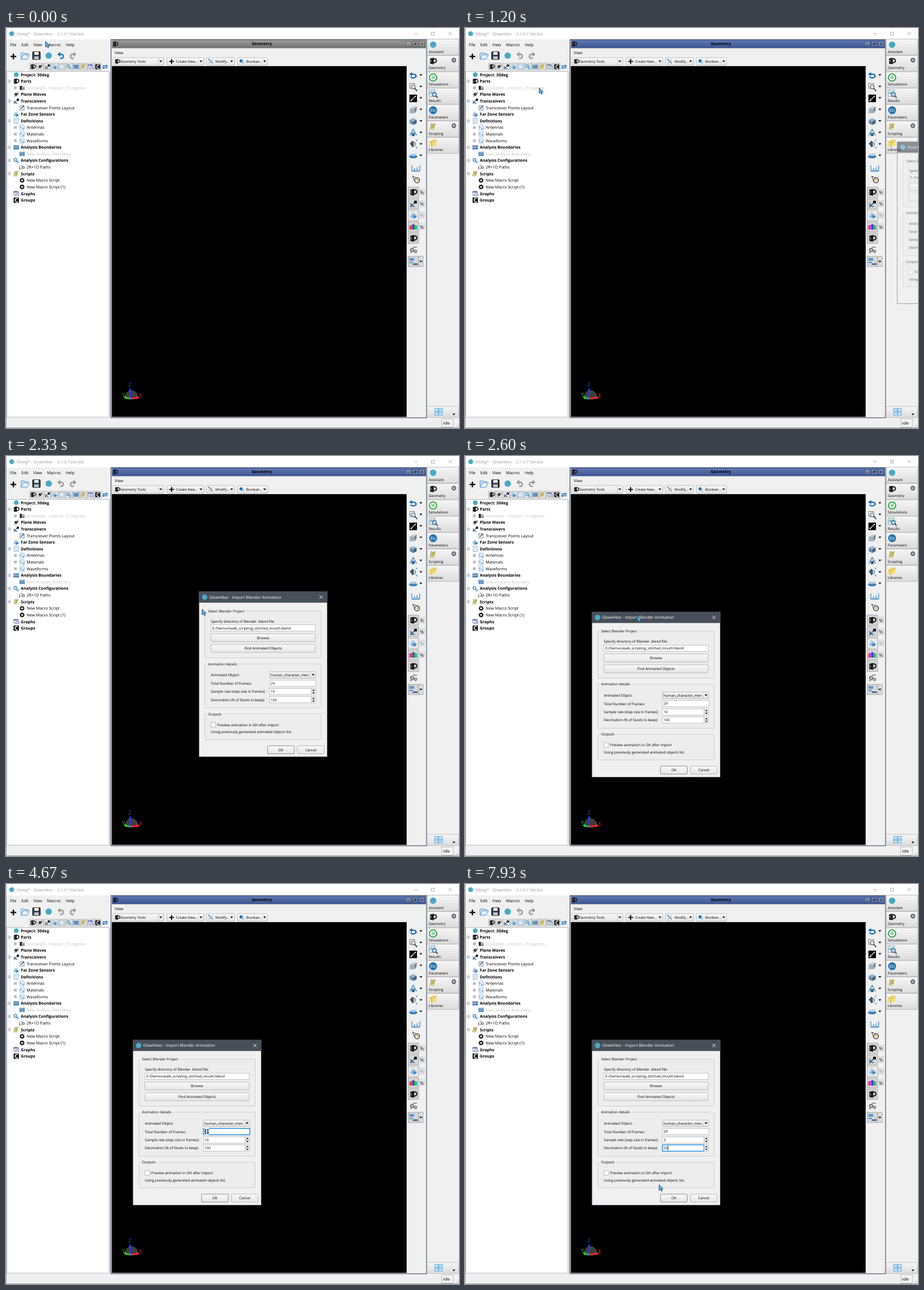
These frames come from a looping animation (796x703 px, 8000 ms). An HTML page:

```html
<!DOCTYPE html>
<html lang="en">
<head>
<meta charset="utf-8">
<title>Import animation</title>
<style>
html, body { margin: 0; width: 100%; height: 100%; overflow: hidden; background: #f0f0f0; }
svg { display: block; position: absolute; left: 0; top: 0; }
text { font-family: "Open Sans", "Noto Sans", sans-serif; text-rendering: geometricPrecision; white-space: pre; }
</style>
</head>
<body>
<svg id="stage" width="796" height="703" viewBox="0 0 796 703"></svg>
<script>
const LOOP = 8000, TICK = 200 / 3;
const APP = 'GlowHiker', ABBR = 'GH';
const $ = id => document.getElementById(id);

// ---------- drawing helpers ----------
const rect = (x, y, w, h, fill, stroke, more = '') =>
  `<rect x="${x}" y="${y}" width="${w}" height="${h}" fill="${fill}"${stroke ? ` stroke="${stroke}"` : ''} ${more}/>`;
const path = (d, stroke, w = 1, fill = 'none') =>
  `<path d="${d}" stroke="${stroke}" stroke-width="${w}" fill="${fill}"/>`;
const shape = (d, fill) => `<path d="${d}" fill="${fill}"/>`;
const dot = (x, y, r, fill, stroke = 'none', w = 1) =>
  `<circle cx="${x}" cy="${y}" r="${r}" fill="${fill}" stroke="${stroke}" stroke-width="${w}"/>`;
const text = (x, y, s, size = 7.1, fill = '#000', more = '') =>
  `<text x="${x}" y="${y + size * .36}" font-size="${size}" fill="${fill}" ${more}>${s}</text>`;
const BOLD = 'font-weight="700"', MID = 'text-anchor="middle"';
const tri = (x, y, fill = '#111') => shape(`M${x - 2.6} ${y - 1.3}h5.2l-2.6 3z`, fill);
const grad = (id, a, b) =>
  `<linearGradient id="${id}" x2="0" y2="1"><stop stop-color="${a}"/><stop offset="1" stop-color="${b}"/></linearGradient>`;

// icons are drawn around 0,0 in a box of about 10 px
const ICON = {
  app: dot(0, 0, 4.3, '#4aa9c4'),
  plus: path('M-5 0H5M0-5V5', '#111', 2.4),
  geo: shape('M-4.5-4L1-5V5L-4.5 4z', '#151515') + path('M1-3.4a3 3 0 1 1 0 5.6L-2 3', '#222', 1.8) +
    path('M-3-2v4', '#aaa', .8),
  part: rect(-4.5, -4, 4, 8, '#222') + rect(0, -2.5, 5, 2, '#777') + rect(0, 1, 5, 2.5, '#555'),
  wave: path('M-4 1l3-4-1 4 3-4-1 4 4-5M-3 4l3-4 0 3 4-5', '#111', 1),
  dish: path('M-4-1Q-4 4 2 4M-2 2L2-2', '#2868a8', 1.4) + rect(1, -4.5, 4, 4, '#111') + path('M-3 2l-1 3', '#111'),
  far: shape('M-1-5L5 1Q3 5-1 4.5Q-5 3-5 0z', '#8dbbe0') + shape('M0 0l5 1Q3 5 0 4z', '#3c83c4') +
    path('M-5 1Q-2-2 1-4', '#dceaf5'),
  page: rect(-4, -4.5, 8, 9, '#f3f9ff', '#6b9cc9', 'stroke-width=".8"') + path('M-2-2h4M-2 0h4M-2 2h4', '#9fc3e2', .7),
  layout: rect(-4, -4, 8, 8.5, '#f6f9fc', '#536d88', 'stroke-width=".9"') + path('M-2 2L3-3', '#24425f', 1.6),
  wform: rect(-4, -4.5, 8, 9, '#f3f9ff', '#6b9cc9', 'stroke-width=".8"') + path('M-4 1q2-5 4 0t4-1', '#2c79b9', .9),
  fence: path('M-4-4.5v9M-1.3-4.5v9M1.4-4.5v9M4-4.5v9M-5.2-1.5H5.2M-5.2 2H5.2', '#1f66a8', 1.2),
  cogs: dot(-1.5, -1.2, 2.7, '#d9edfa', '#2f86c0', 1.3) + dot(2.6, 3, 1.7, '#d9edfa', '#2f86c0', 1),
  scroll: shape('M-3-5h7l1 2h-2l-1 7-2 1h-5l0-3h2z', '#d9cf83') + path('M-3-5l-1 8M-1-3h4M-1.5-1h4M-2 1h4', '#7c7434', .7),
  chart: rect(-4.5, -4, 8, 6.5, '#fff', '#5273b4', 'stroke-width=".8"') + rect(-4.5, -4, 8, 2, '#4269b0') +
    rect(-1, 0, 6, 4, '#fff', '#5273b4', 'stroke-width=".8"') + path('M0 3l2-2 2 1', '#c33', .7),
  group: rect(-4.8, -4.8, 9.6, 9.6, '#000') + path('M3-3Q-2-4-2 0T3 3', '#fff', 1.6),
  po: path('M-3-3a2.5 3 0 1 1-.1 5M-5 5V-2', '#333', 1) + dot(3, 1, 2, 'none', '#333'),
  gear: dot(0, 0, 2.9, '#fff', '#111', 2) + path('M0-5v2M0 3v2M-5 0h2M3 0h2M-3.5-3.5l1.4 1.4M2.1 2.1l1.4 1.4M3.5-3.5L2.1-2.1M-2.1 2.1l-1.4 1.4', '#111', 1.3),
  sync: path('M-5-1.5H3M-3 2H5', '#1f7ac6', 1.8) + shape('M2-4.5l4 3-4 2zM-2 5l-4-3 4-2z', '#1f7ac6'),
  folder: shape('M-5-4h4l1 1h4v7h-9z', '#dbeaf6') + path('M-5-4h4l1 1h4v2M-5-4l0 8.5h8l3-6h-8l-3 6', '#6ba4cf', .9, '#e9f4fc'),
  save: rect(-5, -5, 10, 10, '#2c3640', '#111', 'rx="1"') + rect(-3, -5, 6, 4, '#e8eef3') + rect(-3.2, 1, 6.4, 4, '#b7c4ce'),
  undo: path('M-2-2.5H1A3.4 3.4 0 0 1 1 4H-2', 'currentColor', 2.1) + shape('M-6-2.5L-1.5-6.5V1.5z', 'currentColor'),
  rot: path('M-4 2Q0 5 4 2Q5-2 0-2H-2', '#1b6fb4', 2) + shape('M-6-2l4.5-3V1z', '#1b6fb4'),
  zoom: rect(-5, -5, 7, 7, 'none', '#777', 'stroke-width=".8"') + dot(0, 0, 2.8, '#d7ebf8', '#567') + path('M2 2l4 4', '#345', 1.5),
  line: rect(-5.5, -5.5, 11, 11, '#000') + path('M-3 3L3-3', '#fff', 1) + dot(-3, 3, 1, '#fff') + dot(3, -3, 1, '#fff'),
  cubeG: shape('M-5-2l4-3h6l-3 3z', '#c9d4dc') + rect(-5, -2, 7, 7, '#9fb0bd') + shape('M2-2l3-3v6l-3 4z', '#71848f'),
  cubeB: shape('M-5-2.5L0-5l5 2.5L0 0z', '#9fb9cd') + shape('M-5-2.5L0 0v5.5L-5 3z', '#6d8da8') + shape('M5-2.5L0 0v5.5L5 3z', '#3f6486'),
  lamp: path('M-5 4L0-5 5 4M-3 1H3', '#447aa5', 1.1, '#cfe3f2') + rect(-2, 1, 4, 4, '#2a5f8e'),
  horn: shape('M-5-1l4-4 2 2v6l-2 2z', '#49596b') + path('M2-3Q5 0 2 3M4-5l2-1M4 4l2 2', '#2c79b9', 1),
  disc: shape('M-5-3H5L3 0H-3z', '#bcd4e8') + `<ellipse cx="0" cy="1.5" rx="6" ry="2.6" fill="#3e7fba"/>` + path('M-3 0H3', '#e4f0fa'),
  bars: path('M-6 5H6M-6-4V5M-2 0V5M2-1V5M6-4V5M0 3V5M-4 3V5M4 3V5', '#2d7cc0', 1),
  probe: dot(2, 1.5, 4, '#f5ead0', '#222', 1.1) + path('M-5-5l3 7 1-3 3-1z', '#111', .8, '#fff') + path('M2 2l2-2', '#a40'),
  rays: ['#d33', '#d3d', '#33d', '#2b3', '#2bb'].map((c, i) => rect(-6 + i * 2.3, 4 - 8 + Math.abs(2 - i), 2.3, 8 - Math.abs(2 - i), c)).join(''),
  cogsG: dot(-2, 0, 2.2, '#ddd', '#666', 1.5) + dot(3, 2, 1.7, '#ddd', '#666', 1.2) + path('M-1-4L5-4M-5 4h3', '#777', 1.2),
  panes: rect(-6, -5, 7, 4, '#6396ce') + rect(-6, .5, 5, 2, '#6396ce') + rect(-1, 3, 7, 2, '#27599a'),
  mod: path('M-4-4L4 4', '#5e93bd', 1.8) + path('M4-4L-4 4', '#9ab', 1.3) + dot(-4, -4, 1.5, '#5e93bd'),
  bool: dot(-1.5, -1, 3.4, '#2470ac') + dot(2, 2, 2.7, '#a9cbe5'),
  sim: dot(0, 0, 5.5, '#fff', '#27a03a', 1.6) + path('M0-3v6M-2-2v4M2-2v4', '#27a03a', .9),
  res: rect(-6, -6, 9, 10, '#d8eaf6', '#79a', 'stroke-width=".7"') + path('M-5 0l2-3 2 4 2-5', '#2a8', .9) + dot(2, 1, 3, '#b5d7ee', '#357') + path('M4 3l3 3', '#246', 1.6),
  fx: dot(0, 0, 7, '#2473ae') + text(0, -.3, 'f(x)', 7, '#fff', MID + ' font-style="italic"'),
  lib: shape('M-6-2l6-4 5 1v8l-7 3-4-1z', '#f2dc7a') + path('M-6-2l4 1v7M-2-1l7-3', '#c9a93c', .8),
  grid: [0, 1, 2, 3].map(i => rect(-7 + i % 2 * 7.5, -6 + (i >> 1) * 6.5, 6.5, 5.5, '#bfe0f5', '#4d9cd0', 'stroke-width=".7"')).join('')
};
const icon = (name, x, y, s = 1, more = '') => `<g transform="translate(${x} ${y}) scale(${s})" ${more}>${ICON[name]}</g>`;

// ---------- main window ----------
function titleBar() {
  return rect(0, 0, 796, 703, '#f0f0f0') + rect(0, 0, 796, 20, '#fff') +
    icon('app', 10, 10) + text(18, 10, `30deg* - ${APP} -  2.1.0.7 (64-bit)`, 7.1, '#999') +
    path('M717.5 10h6M747.5 7.5h5.500v5h-5.500zM777.500 7l6 6m0-6l-6 6', '#999', .8) +
    [['File', 7], ['Edit', 27], ['View', 48], ['Macros', 72], ['Help', 105]].map(m => text(m[1], 29, m[0])).join('');
}

function leftTools() {
  const small = ['geo', 'wave', 'dish', 'far', 'page', 'cogs', 'fence', 'scroll', 'chart', 'group'];
  return icon('plus', 13, 50) + icon('folder', 33, 49, 1.3) + icon('save', 53.5, 48.500, 1.3) + icon('app', 75, 48.500, 1.3) +
    `<g id="undo">${icon('undo', 97, 49, 1.1)}</g>` + icon('undo', 117, 49, 1.1, 'color="#999"').replace('scale(1.1)', 'scale(-1.1 1.1)') +
    small.map((n, i) => rect(41.5 + i * 12.65, 62, 11.8, 12, '#e2e2e2', '#a8a8a8', 'stroke-width=".7"') + icon(n, 47.4 + i * 12.65, 68, .88)).join('') +
    icon('sync', 174, 68, .9);
}

// rows: label, icon, level, style (b bold, g grey), expander
const ROWS = [
  ['Project: 30deg', 'app', 0, 'b'], ['Parts', 'geo', 0, 'b', '-'], ['Animated - rotation_15 degrees', 'part', 1, 'g', '+'],
  ['Plane Waves', 'wave', 0, 'b'], ['Transceivers', 'dish', 0, 'b', '-'], ['Transceiver Points Layout', 'layout', 1],
  ['Far Zone Sensors', 'far', 0, 'b'], ['Definitions', 'page', 0, 'b', '-'], ['Antennas', 'wform', 1, '', '+'],
  ['Materials', 'wform', 1, '', '+'], ['Waveforms', 'wform', 1, '', '+'], ['Analysis Boundaries', 'fence', 0, 'b', '-'],
  ['New Analysis Boundary', 'fence', 1, 'g'], ['Analysis Configurations', 'cogs', 0, 'b', '-'], ['2R+1D Paths', 'po', 1],
  ['Scripts', 'scroll', 0, 'b', '-'], ['New Macro Script', 'gear', 1], ['New Macro Script (1)', 'gear', 1],
  ['Graphs', 'chart', 0, 'b'], ['Groups', 'group', 0, 'b']
];
function tree() {
  let s = rect(1.5, 76.5, 179.5, 607.5, '#fff', '#a5adb5', 'stroke-width=".8"') +
    path('M183 76V684', '#bbb', 1) + path('M6.500 94V257', '#d0d0d0', .5);
  ROWS.forEach(([label, ic, lv, st = '', ex], i) => {
    const y = 82 + i * 11.61, x = 6 + lv * 10.5;
    if (ex) s += rect(x - 2, y - 2, 4, 4, '#fff', '#999', 'stroke-width=".7"') +
      path(`M${x - 1.2} ${y}h2.4` + (ex == '+' ? `M${x} ${y - 1.2}v2.4` : ''), '#444', .6);
    s += icon(ic, 18 + lv * 10.3, y, lv ? .9 : .95) +
      text(26 + lv * 10.3, y, label, 7.1, st == 'g' ? '#c4c4c4' : '#000', st == 'b' ? BOLD : '');
  });
  return s;
}

function geometry() {
  const btn = (x, w, label, ic, tx) => rect(x, 52, w, 13.5, 'url(#btn)', '#b0b0b0', 'rx="1.5" stroke-width=".8"') +
    icon(ic, x + 8, 58.700, .85) + text(tx, 58.8, label, 6.15) + tri(x + w - 5, 58.5);
  let s = rect(184.5, 20.5, 554.500, 664.5, '#f0f0f0', '#26384f') + rect(186, 21, 552, 14.500, 'url(#idle)', '', 'id="bar"') +
    icon('geo', 192, 28, .9) + text(449.5, 27.8, 'Geometry', 7.2, '#000', BOLD + ' ' + MID) +
    [707, 719, 731].map(x => rect(x - 4.5, 23.5, 9, 9, '#ffffff30', '#34404f', 'stroke-width=".6"')).join('') +
    path('M705 30h3.500M717.200 27.200h2.500v2.500h-2.500zM718.500 26h2.500v2.500M729 26l4 4m0-4l-4 4', '#111', .8) +
    text(191, 43, 'View', 7) + rect(186, 67, 518, 616.5, '#000') +
    btn(187.5, 89.5, 'Geometry Tools', 'geo', 200.500) + path('M268 52.5v12.5', '#bbb', .7) +
    btn(283, 64.500, 'Create New...', 'plus', 299) + btn(352, 49.500, 'Modify...', 'mod', 368) + btn(406.5, 53, 'Boolean...', 'bool', 422);
  ['rot', 'zoom', 'line', 'cubeG', 'cubeB', 'lamp', 'horn', 'disc'].forEach((n, i) => {
    s += icon(n, 715.5, 83.500 + i * 20.1, 1.2) + tri(729, 82.500 + i * 20.2);
  });
  s += icon('bars', 720, 246, 1.15) + icon('probe', 720, 266, 1.1);
  ['geo', 'dish', 'far', 'rays', 'geo', '', 'panes'].forEach((n, i) => {
    const y = 288.7 + i * 20.25;
    if (!n) { s += icon('cogsG', 716, 390, 1.2); return; }
    s += rect(706.5, y - 9, 18.5, 18, i == 2 ? '#ececec' : '#d6d6d6', '#9b9b9b', 'stroke-width=".8"') + icon(n, 716, y, 1.2);
    if (i < 4) s += rect(725.5, y - 5.5, 10, 10, '#e8e8e8', '#bbb', 'stroke-width=".6"') + text(730.7, y, '%', 8.5, i == 2 ? '#999' : '#222', MID);
    if (i == 6) s += rect(725, y - 9, 8, 18, '#dcdcdc', '#9b9b9b', 'stroke-width=".8"') + tri(729, y);
  });
  // axis gizmo
  return s + path('M209 650A11.500 13 0 0 1 232 650Q220 656 209 650z', '#555', .6, '#3d3d3d') +
    path('M218 651V636', '#2638ff', 2) + shape('M215.500 638l2.500-6 2.500 6z', '#2638ff') +
    path('M218 651l13-1', '#f22', 2.4) + shape('M229 647l7 2.500-7 3z', '#f22') +
    path('M218 651l-7-1', '#2d2', 2.4) + shape('M212 647l-5.500 1.500 4.500 4z', '#2d2') + dot(218, 651, 1.6, '#4a6cff') +
    text(217.800, 626.500, 'Z', 9.5, '#3540d8', MID) + text(236.5, 645.500, 'X', 9.5, '#c33', MID) + text(206.5, 644.500, 'Y', 9.5, '#2b2', MID);
}

function sidebar() {
  const tabs = [['Assistant', 'app'], ['Geometry', 'geo', 1], ['Simulations', 'sim'], ['Results', 'res'],
    ['Parameters', 'fx'], ['Scripting', 'scroll', 1], ['Libraries', 'lib']];
  return tabs.map(([label, ic, x], i) => {
    const y = 19.500 + i * 28.8;
    return rect(740, y, 55.5, 28, 'url(#tab)', '#b4b4b4', 'stroke-width=".8"') +
      icon(ic, 750.500, y + 9.800, i == 0 ? 1.3 : i == 4 ? 1 : 1.15) + text(743, y + 21.8, label, 6.25) +
      (x ? dot(787, y + 8.200, 4.2, '#6b7278') + path(`M785.500 ${y + 6.7}l3 3m0-3l-3 3`, '#fff', 1) : '');
  }).join('') +
    rect(740, 665, 55.500, 19.5, 'url(#tab)', '#b4b4b4', 'stroke-width=".8"') + icon('grid', 760, 674.500) + tri(787, 679) +
    rect(765.500, 687, 20.500, 14.5, '#f4f4f4', '#aaa', 'stroke-width=".8"') + text(768, 694.2, 'Idle', 7.1) +
    path('M.5 0V703M0 702.500H796', '#8795a3', .8) + path('M790 702l5-5M793 702l2-2', '#aaa', .8);
}

// ---------- dialog, laid out at its resting place 223,274 ----------
const FIELDS = [[429.700, 81.5, 'frames'], [444.300, 73, 'rate'], [458.500, 73, 'keep']];
function dialog() {
  const S = 6.25;
  const lab = (x, y, s, more) => text(x, y, s, S, '#000', more);
  const box = (y, h, label, w) => rect(233.5, y, 204.5, h, '#ededed', '#c6c6c6', 'rx="1.5" stroke-width=".8"') +
    rect(237, y - 3, w, 6, '#f0f0f0') + lab(239, y, label);
  const btn = (x, y, w, h, label, id = '', line = '#adadad') =>
    rect(x, y, w, h, 'url(#btn)', line, `rx="1.5" stroke-width=".8" ${id && `id="${id}"`}`) + lab(x + w / 2, y + h / 2, label, MID);
  let s = rect(223, 274, 225.500, 290.500, '#f0f0f0', '#3d444d', 'stroke-width=".8"') + rect(223, 274, 225.500, 19.500, '#484f59') +
    icon('app', 233, 283.800, 1.1) + text(241, 283.8, `${APP} - Import Blender Animation`, 7.1, '#fff') +
    path('M434.700 281l5.600 5.600m0-5.600l-5.600 5.600', '#fff', .9) +
    box(308, 82.500, 'Select Blender Project', 67) + box(401, 77.500, 'Animation details', 53) + box(489, 45, 'Outputs', 27) +
    lab(244, 326, 'Specify directory of Blender .blend file:') +
    rect(244, 332.500, 183.5, 11, '#fff', '#b5b5b5', 'stroke-width=".8"') + lab(246.5, 338.2, 'E:/Demos/walk_scripting_stitched_mouth.blend') +
    btn(244, 348, 183.5, 14, 'Browse', 'browse') + btn(244, 366.800, 183.5, 14, 'Find Animated Objects', 'find') +
    lab(244, 420.500, 'Animated Object:') + rect(347, 415, 81, 11, 'url(#btn)', '#adadad', 'rx="1" stroke-width=".8"') +
    lab(349, 420.6, 'human_character_men') + path('M419 415.500v10', '#bbb', .7) + tri(423.500, 420.300) +
    lab(244, 435.300, 'Total Number of Frames:') + lab(244, 449.6, 'Sample rate (step size in frames):') +
    lab(244, 464, 'Decimation (% of facets to keep):');
  FIELDS.forEach(([y, w, id], i) => {
    const c = y + 5.500;
    s += rect(347, y, w, 11, '#fff', '#b5b5b5', `stroke-width=".8" id="${id}Box"`) + rect(349, y + 1, 0, 9, '#0b4384', '', `id="${id}Sel"`) +
      lab(349, c, '', `id="${id}"`) + rect(349, y + 1.200, .8, 8.600, '#000', '', `id="${id}Caret"`);
    if (i) s += rect(420.5, y, 7.5, 11, '#f3f3f3', '#b5b5b5', 'stroke-width=".6"') + path(`M420.500 ${c}h7.500`, '#bbb', .6) +
      shape(`M422 ${c - 1.500}h4.400l-2.200-2.600zM422 ${c + 1.500}h4.400l-2.200 2.600z`, '#111');
  });
  return s + rect(244, 504, 8, 8, '#fff', '#aaa', 'stroke-width=".8" id="check"') +
    lab(255, 508, `Preview animation in ${ABBR} after import`) + lab(244, 520.7, 'Using previously generated animated objects list.') +
    btn(343.500, 545, 47, 14, 'OK', '', '#777') + btn(396, 545, 47, 14, 'Cancel');
}

$('stage').innerHTML = '<defs>' + grad('btn', '#f8f8f8', '#e6e6e6') + grad('tab', '#f6f6f6', '#dcdcdc') +
  grad('idle', '#9c9c9c', '#707070') + grad('live', '#6078b2', '#3d5492') + '</defs>' +
  titleBar() + leftTools() + tree() + geometry() + sidebar() + `<g id="dlg">${dialog()}</g>` +
  '<path id="arrow" d="M0 0V10L2.300 8 4 11.500 5.700 10.700 4.200 7.400H7.200z" fill="#5bb3e8" stroke="#173a5a" stroke-width=".8"/>' +
  '<path id="beam" d="M-4-5.200H4M-4 5.200H4M0-5V5" fill="none" stroke="#111" stroke-width="1.400"/>';

// ---------- motion: rows of time, x, y ----------
const MOUSE = [
  [70, 69.5, 23.5], [400, 92, 62], [667, 129.5, 105], [1200, 129.5, 105], [1667, 837, 206], [2133, 837, 206],
  [2200, 537.5, 217], [2267, 420, 246], [2333, 345, 269], [2400, 312, 279], [2467, 303, 281], [2600, 303, 281],
  [3000, 328, 352], [3333, 366.5, 433], [3400, 366.5, 433], [3600, 368.5, 436], [3800, 369.5, 436],
  [4067, 370, 436.5], [4133, 370, 438], [4267, 370, 438], [4533, 353, 435], [4667, 352.5, 435],
  [5467, 415, 466], [5533, 415, 466], [5867, 384.5, 453.5], [6000, 384.5, 453.5], [6067, 380, 451], [6267, 347, 450],
  [6400, 347, 450], [6533, 372, 464], [6600, 372, 464], [6933, 327.5, 466], [7667, 327.5, 466], [7933, 341, 528.5]
];
const DRAG = [[2133, 757, 197], [2200, 598, 198], [2267, 458, 209], [2333, 340, 238], [2400, 265, 261], [2467, 232, 272], [2533, 223, 274]];

function at(keys, t) {
  let i = 0;
  while (i < keys.length - 1 && keys[i + 1][0] <= t + 1) i++;
  const a = keys[i], b = keys[i + 1] || a;
  const p = b === a ? 0 : Math.max(0, Math.min(1, (t - a[0]) / (b[0] - a[0])));
  return [a[1] + (b[1] - a[1]) * p, a[2] + (b[2] - a[2]) * p];
}
const put = (id, o) => { for (const k in o) $(id).setAttribute(k, o[k]); };
const show = (id, on) => put(id, { visibility: on ? 'visible' : 'hidden' });

function field(i, value, focus, sel, caret) {
  const id = FIELDS[i][2], end = value.length * 3.57;
  $(id).textContent = value;
  put(id, { fill: focus && sel > 3 ? '#fff' : '#000' });
  put(id + 'Box', { stroke: focus ? '#0078d7' : '#b5b5b5', 'stroke-width': focus ? 1.2 : .8 });
  put(id + 'Sel', { x: 349 + end - (focus ? sel : 0), width: focus ? sel : 0 });
  put(id + 'Caret', { x: sel ? 349 : 349 + end + .2 });
  show(id + 'Caret', focus && caret);
}

function draw(now) {
  const t = Math.floor((now % LOOP + 4) / TICK) * TICK + .5;
  const [mx, my] = at(MOUSE, t);
  const live = t >= 600;
  put('bar', { fill: live ? 'url(#live)' : 'url(#idle)' });
  put('undo', { color: live ? '#999' : '#1f72b8' });

  const p = Math.max(0, Math.min(1, (t - 1130) / 200)), ease = 1 - (1 - p) ** 2, k = .95 + .05 * ease;
  const [x, y] = at(DRAG, t);
  put('dlg', {
    opacity: ease, display: t >= 1130 ? 'inline' : 'none',
    transform: `translate(${x + 112.5} ${y + 145}) scale(${k}) translate(-335.5 -419)`
  });

  const over = (a, b) => t > 2600 && mx > 244 && mx < 428 && my > a && my < b;
  put('browse', { fill: over(348, 362) ? '#f9fcff' : 'url(#btn)' });
  put('find', { fill: over(366, 381) ? '#f9fcff' : 'url(#btn)' });
  put('check', { stroke: over(503, 513) ? '#0078d7' : '#aaa' });

  // dragging leftwards selects from the end of the value to the pointer
  const pick = (n, from) => t < from ? 0 : Math.max(0, Math.min(n * 3.57, 349 + n * 3.57 - mx));
  const focus = t < 4330 ? -1 : t < 5867 ? 0 : t < 6530 ? 1 : 2;
  const typed = t >= 6330, keep = t < 7600 ? '100' : t < 7660 ? '5' : '50';
  field(0, '29', focus == 0, t < 4660 ? pick(2, 4330) : 7.14, t < 4500);
  field(1, typed ? '3' : '10', focus == 1, typed ? 0 : pick(2, 6060), true);
  field(2, keep, focus == 2, t < 7600 ? pick(3, 6590) : 0, t < 7260 || t >= 7600);

  const edit = t > 2600 && t < 7660 && mx > 345 && my > 428 || t > 6590 && t < 7660;
  const move = `translate(${mx} ${my})`;
  show('arrow', !edit);
  show('beam', edit);
  put('arrow', { transform: move });
  put('beam', { transform: move, stroke: t > 4500 && mx < 356 && my < 441 ? '#fff' : '#111' });
}

const start = performance.now();
(function frame() {
  draw(performance.now() - start);
  requestAnimationFrame(frame);
})();
</script>
</body>
</html>
```
